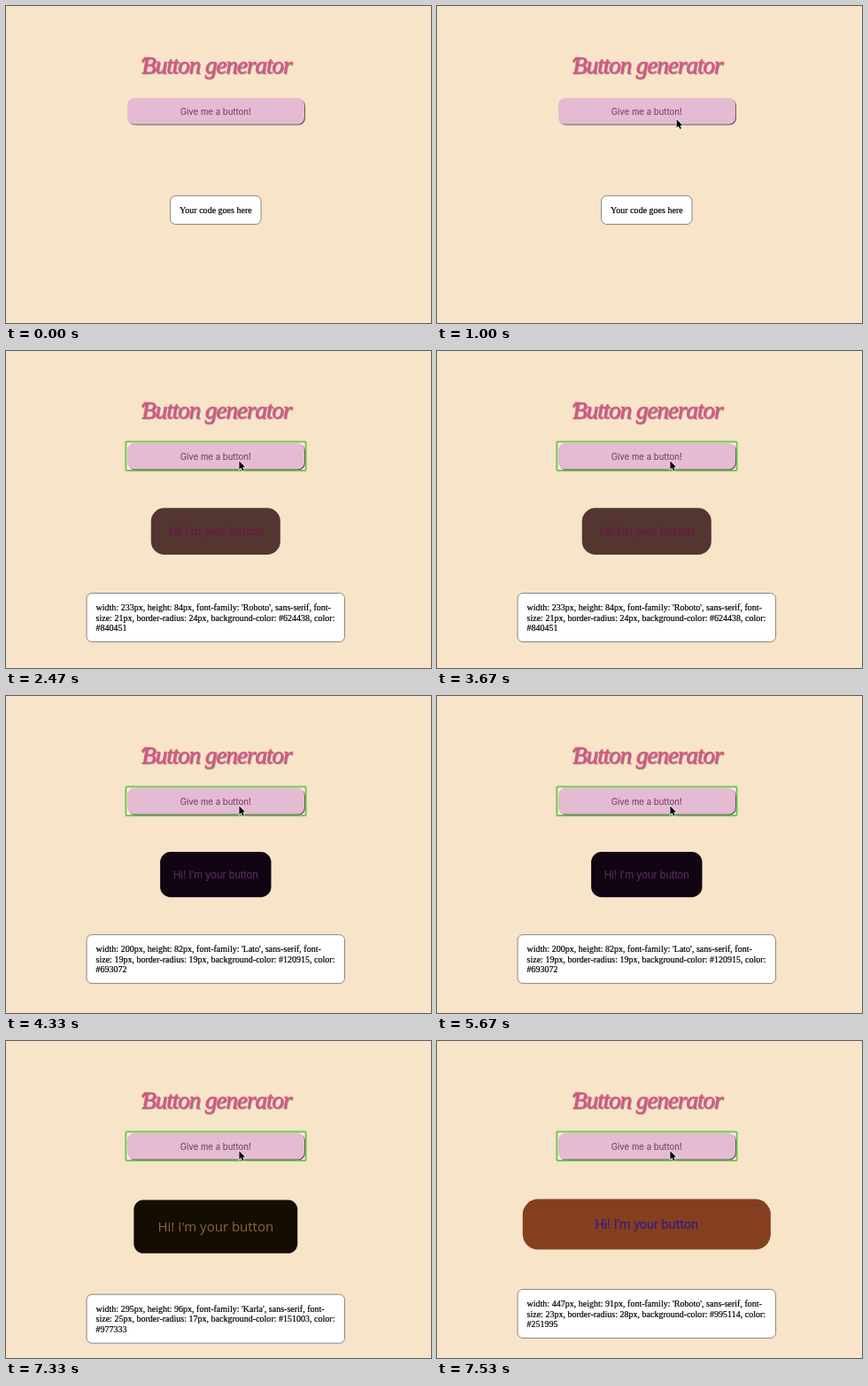
An HTML page for the animation above (8000 ms loop, 480 px wide and 358 px high).

```html
<!DOCTYPE html>
<html lang="en">
<head>
<meta charset="utf-8">
<title>Button generator</title>
<style>
  html, body { margin: 0; width: 100%; height: 100%; overflow: hidden; background: #f7e4c9; }
  svg { display: block; width: 480px; height: 358px; }
  .title {
    font: italic 27px "Liberation Serif", serif;
    letter-spacing: -1px;
    fill: #d9557f; stroke: #d9557f; stroke-width: .35px;
    filter: drop-shadow(1px 1px 0 #a0808c);
  }
  .title path { fill: none; stroke-width: 1.8px; stroke-linecap: round; }
  .shadow { fill: #6a5a60; }
  .give { fill: #e5bad3; }
  .label { font: 9.65px Inter, sans-serif; fill: #7b4560; stroke: #7b4560; stroke-width: .12px; }
  .ring { fill: #fff; fill-opacity: .45; stroke: #71c94f; stroke-width: 2px; }
  .code { font: 10.03px "Liberation Serif", serif; fill: #000; stroke: #000; stroke-width: .2px; }
  .box { fill: #fff; stroke: #6c6c6c; stroke-width: .8px; }
  .label, .preview text { text-anchor: middle; }
</style>
</head>
<body>
<svg viewBox="0 0 480 358">
  <g class="title">
    <text x="153" y="76.4">Button generator</text>
    <path d="M154 62.5Q154.5 59.5 161 59"/>
  </g>
  <rect id="ring" class="ring" x="135.4" y="102.4" width="203.2" height="32.6" rx="1"/>
  <rect class="shadow" x="138" y="105" width="200" height="29.6" rx="8"/>
  <rect class="give" x="137" y="104" width="200" height="29.6" rx="8"/>
  <text class="label" x="236.8" y="123">Give me a button!</text>
  <g id="preview" class="preview">
    <rect id="face"/>
    <text id="hi" x="236.8">Hi! I'm your button</text>
  </g>
  <rect id="box" class="box" rx="6"/>
  <g id="code" class="code"></g>
  <path id="cursor" d="M0 0V9.6L2.2 7.6 3.7 11 5.3 10.3 3.8 7H6.8Z" fill="#000" stroke="#fff" stroke-width="1.2" paint-order="stroke"/>
</svg>
<script>
const LOOP = 8000, STEP = 1000 / 15, SCALE = .6267, CENTER = 236.8, LINE = 11.4;
const $ = id => document.getElementById(id);
const set = (el, attrs) => {
  for (const k in attrs) el.setAttribute(k, attrs[k]);
};

// w, h, size and radius are the generated CSS values; bg and ink are the colours on screen
const states = [
  { at: 0, boxTop: 214.3, boxWidth: 102.4, lines: ["Your code goes here"] },
  { at: 2465, w: 233, h: 84, size: 21, radius: 24, name: "Roboto", css: ["#624438", "#840451"],
    bg: "#53362f", ink: "#6c1848", font: "Roboto", bold: .25, top: 177.3, boxTop: 273.5 },
  { at: 3998, w: 200, h: 82, size: 19, radius: 19, name: "Lato", css: ["#120915", "#693072"],
    bg: "#110413", ink: "#5a3162", font: "Liberation Sans", top: 175.9, boxTop: 269.6 },
  { at: 5928, w: 295, h: 96, size: 25, radius: 17, name: "Karla", css: ["#151003", "#977333"],
    bg: "#130e01", ink: "#8b6734", font: "Open Sans", fontSize: 15, top: 179.6, boxTop: 286.2 },
  { at: 7465, w: 447, h: 91, size: 23, radius: 28, name: "Roboto", css: ["#995114", "#251995"],
    bg: "#853f1f", ink: "#36207c", font: "Roboto", bold: .25, top: 178.5, boxTop: 280.5 },
];

const cssLines = s => [
  `width: ${s.w}px, height: ${s.h}px, font-family: '${s.name}', sans-serif, font-`,
  `size: ${s.size}px, border-radius: ${s.radius}px, background-color: ${s.css[0]}, color:`,
  s.css[1],
];

function showPreview(s) {
  const w = s.w * SCALE, h = s.h * SCALE;
  const size = s.fontSize || s.size * SCALE;
  set($("face"), { x: CENTER - w / 2, y: s.top, width: w, height: h, rx: s.radius * SCALE, fill: s.bg });
  set($("hi"), {
    y: s.top + h / 2 + size * .35, fill: s.ink, stroke: s.ink, "stroke-width": s.bold || 0,
    "font-family": `"${s.font}", sans-serif`, "font-size": size,
  });
}

function showCode(s) {
  const lines = s.lines || cssLines(s);
  const width = s.boxWidth || 291.5, x = CENTER - width / 2;
  set($("box"), { x, y: s.boxTop, width, height: lines.length * LINE + 20.8 });
  $("code").replaceChildren(...lines.map((line, i) => {
    const text = document.createElementNS("http://www.w3.org/2000/svg", "text");
    set(text, { x: x + 10.5, y: s.boxTop + 19.6 + i * LINE });
    text.textContent = line;
    return text;
  }));
}

let shown;
function showState(s) {
  if (s === shown) return;
  shown = s;
  const display = s.w ? "inline" : "none";
  set($("ring"), { display });
  set($("preview"), { display });
  if (s.w) showPreview(s);
  showCode(s);
}

// time, x, y of the pointer tip
const path = [[267, 325.5, 308], [733, 272.3, 129], [867, 272.3, 130], [1000, 270.7, 128], [1200, 263.4, 124.2]];

function pointerAt(t) {
  const i = path.findIndex(p => p[0] > t);
  if (i < 0) return path[path.length - 1].slice(1);
  const a = path[i - 1], b = path[i];
  let u = (t - a[0]) / (b[0] - a[0]);
  if (i === 1) u = 1 - (1 - u) ** 2;
  return [a[1] + (b[1] - a[1]) * u, a[2] + (b[2] - a[2]) * u];
}

function render(t) {
  showState(states.findLast(s => t >= s.at));
  const tick = Math.floor((t + 3) / STEP) * STEP + 1;
  const visible = tick >= path[0][0];
  set($("cursor"), { display: visible ? "inline" : "none" });
  if (visible) set($("cursor"), { transform: `translate(${pointerAt(tick)})` });
}

function frame() {
  render(performance.now() % LOOP);
  requestAnimationFrame(frame);
}
frame();
</script>
</body>
</html>
```
